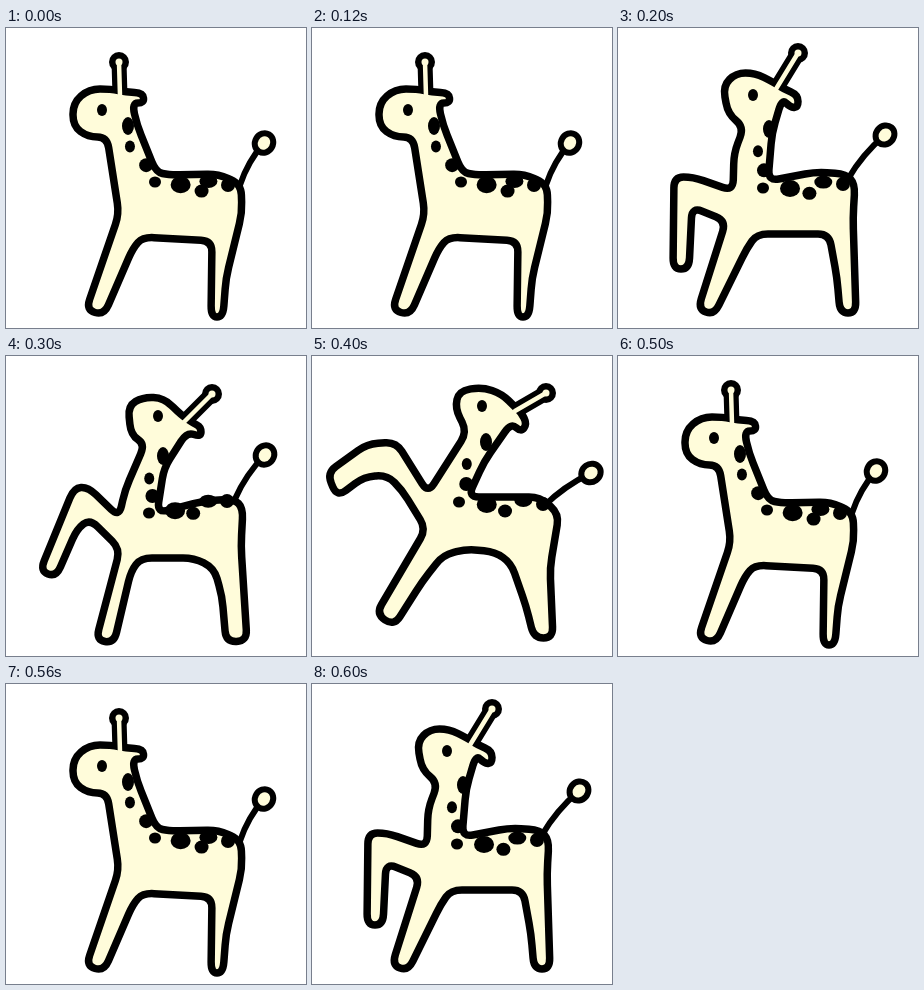
An HTML page with a canvas that plays this animation: 300x300 px, repeating every 0.7 s.

```html
<!DOCTYPE html>
<html>
<head>
<meta charset="utf-8">
<style>
html, body { margin: 0; height: 100%; overflow: hidden; background: #fff; }
canvas { display: block; width: 100%; height: 100%; }
</style>
</head>
<body>
<canvas id="stage" width="300" height="300"></canvas>
<script>
const INK = '#000', SKIN = '#fffcda';

// outline: corners clockwise from the ear; marks: spots at nape, chest and rump
const poses = [
  { // standing
    outline: {
      ear: '120,64 137,65 138,75 126,75',
      back: '131,97 150,144 163,147 212,146 235,156',
      hindLeg: '236,185 220,250 217,289 205,289 206,213',
      foreLeg: '137,209 127,220 98,287 80,282 113,186',
      head: '101,109 82,109 67,98 67,75 83,61 105,61'
    },
    eye: [96, 82], marks: [[122, 98], [149, 154], [222, 157]],
    horn: [[114, 68], [113, 34]], tail: [[234, 157], [258, 115]]
  },
  { // leg lifted
    outline: {
      ear: '166,61 180,67 180,80 172,79 164,71',
      back: '154,105 150,153 198,144 228,146 237,156',
      hindLeg: '235,190 238,285 222,285 219,250 211,206',
      foreLeg: '139,206 129,220 96,287 80,281 108,193',
      lifted: '74,179 71,241 55,241 56,149 75,149 115,163',
      head: '116,125 126,99 110,86 105,58 118,45 137,45 155,54'
    },
    eye: [135, 67], marks: [[151, 101], [145, 160], [225, 156]],
    horn: [[158, 61], [180, 25]], tail: [[230, 151], [267, 107]]
  },
  { // rearing
    outline: {
      ear: '187,67 195,71 195,81 181,76',
      back: '158,112 151,157 198,145 228,143 237,152',
      hindLeg: '235,190 241,285 220,286 216,240 208,212 188,202',
      foreLeg: '135,202 125,215 108,287 90,284 114,193',
      lifted: '84,163 71,173 50,221 34,215 68,132 82,131 113,161',
      head: '119,134 139,88 125,79 122,50 137,41 158,42 175,59'
    },
    eye: [152, 60], marks: [[157, 100], [143, 157], [221, 145]],
    horn: [[178, 66], [206, 38]], tail: [[229, 143], [259, 99]]
  },
  { // leaping
    outline: {
      ear: '209,56 215,68 209,76 199,67',
      back: '172,106 156,141 228,141 247,158',
      hindLeg: '238,212 241,282 222,282 214,250 199,207 183,196',
      foreLeg: '155,193 131,199 110,226 82,270 64,258 114,173',
      lifted: '90,134 75,119 52,121 25,141 15,117 55,88 84,86 116,137',
      head: '155,76 143,52 147,35 170,31 190,38 203,51'
    },
    eye: [170, 50], marks: [[174, 86], [147, 146], [231, 148]],
    horn: [[203, 55], [234, 37]], tail: [[232, 150], [279, 117]]
  }
];

// [along the neck, along the back, rx, ry], measured from the chest mark
const spots = [
  [1, 0, 6, 9], [.63, -.11, 5, 6], [.3, -.01, 7, 7], [0, 0, 6, 5.5],
  [-.03, .34, 10, 8.5], [-.13, .59, 7, 6.5], [.05, .75, 9, 6.5], [0, 1, 7, 7]
];

const ctx = document.getElementById('stage').getContext('2d');
ctx.lineJoin = ctx.lineCap = 'round';

const mix = (a, b, t) => [a[0] + (b[0] - a[0]) * t, a[1] + (b[1] - a[1]) * t];

function toward(from, to, reach) {
  const len = Math.hypot(to[0] - from[0], to[1] - from[1]);
  return mix(from, to, Math.min(.5, reach / len));
}

function stroke(width, color = INK) {
  ctx.lineWidth = width;
  ctx.strokeStyle = color;
  ctx.stroke();
}

function oval([x, y], rx, ry, color, turn = 0) {
  ctx.beginPath();
  ctx.ellipse(x, y, rx, ry, turn, 0, 7);
  ctx.fillStyle = color;
  ctx.fill();
}

// Closed shape with every corner rounded off
function drawBody(outline) {
  const pts = Object.values(outline).join(' ').split(' ').map(p => p.split(',').map(Number));
  ctx.beginPath();
  pts.forEach((p, i) => {
    const prev = pts.at(i - 1), next = pts[(i + 1) % pts.length];
    ctx.lineTo(...toward(p, prev, 11));
    ctx.quadraticCurveTo(...p, ...toward(p, next, 11));
  });
  ctx.closePath();
  ctx.fillStyle = SKIN;
  ctx.fill();
  stroke(7.5);
}

function drawTail([root, tip]) {
  const [x, y] = mix(root, tip, .5);
  ctx.beginPath();
  ctx.moveTo(...root);
  ctx.quadraticCurveTo(x - 4, y - 3, ...tip);
  stroke(6);
  const turn = Math.atan2(tip[1] - root[1], tip[0] - root[0]);
  oval(tip, 10, 9, SKIN, turn);
  stroke(6);
}

function drawHorn([base, knob], width, radius, color) {
  ctx.beginPath();
  ctx.moveTo(...base);
  ctx.lineTo(...knob);
  stroke(width, color);
  oval(knob, radius, radius, color);
}

function drawSpots([nape, chest, rump]) {
  for (const [u, v, rx, ry] of spots) {
    const [nx, ny] = mix(chest, nape, u), [bx, by] = mix(chest, rump, v);
    oval([nx + bx - chest[0], ny + by - chest[1]], rx, ry, INK);
  }
}

function drawPose({ outline, eye, marks, horn, tail }) {
  ctx.clearRect(0, 0, 300, 300);
  drawTail(tail);
  drawHorn(horn, 15, 10, INK);
  drawBody(outline);
  drawHorn(horn, 4.5, 3.5, SKIN);
  drawSpots(marks);
  oval(eye, 5, 6, INK);
}

const order = [0, 0, 1, 2, 3, 0, 1]; // one pose per 100 ms
let start;

function tick(now) {
  start ??= now;
  drawPose(poses[order[Math.floor((now - start) % 700 / 100)]]);
  requestAnimationFrame(tick);
}
drawPose(poses[0]);
requestAnimationFrame(tick);
</script>
</body>
</html>
```
